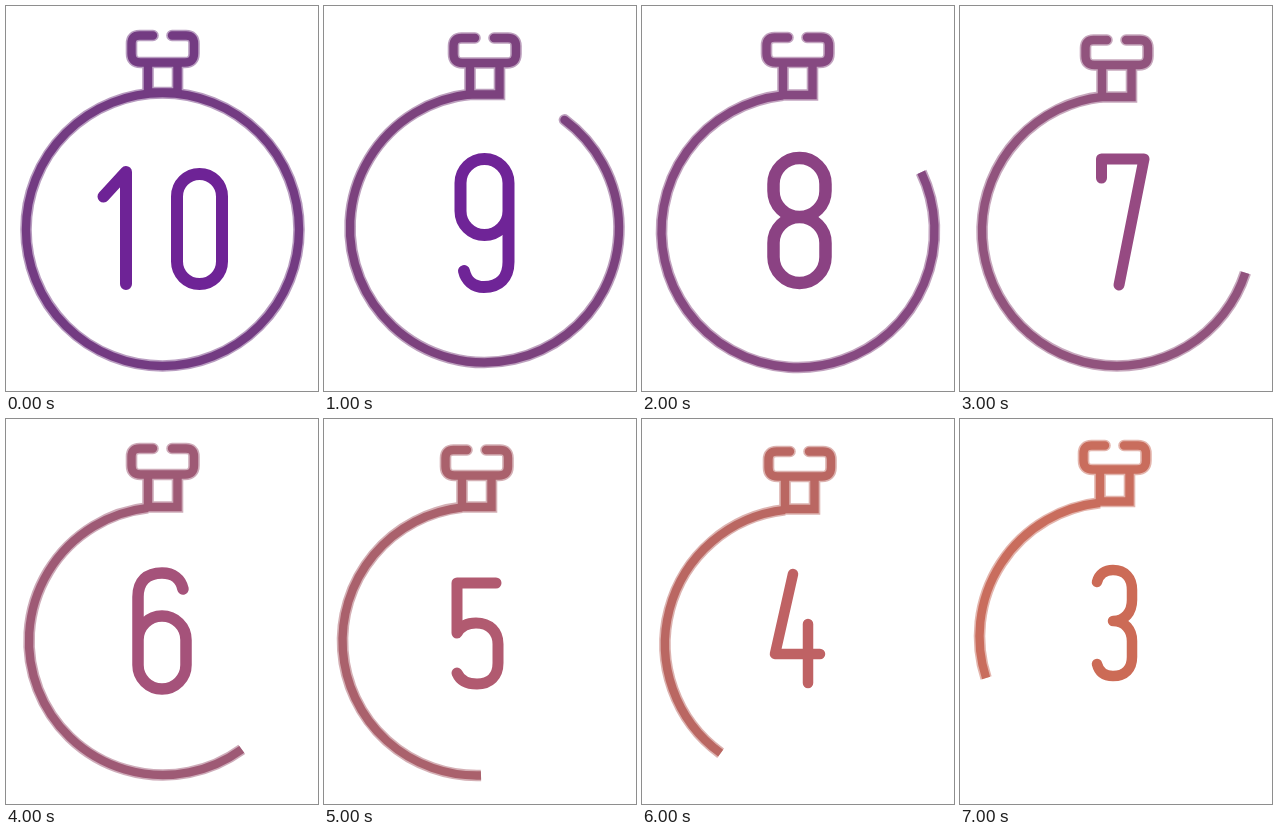
An HTML page that plays this animation: 312 px wide and 385 px high, repeating every 8 s.

```html
<!DOCTYPE html>
<html lang="en">
<head>
<meta charset="utf-8">
<title>Countdown stopwatch</title>
<style>
html, body { margin: 0; width: 100%; height: 100%; overflow: hidden; background: #fff; }
svg { display: block; width: 100vw; height: 100vh; }
path { fill: none; }
#digit { stroke-linecap: round; stroke-linejoin: round; }
</style>
</head>
<body>
<svg viewBox="0 0 312 385">
  <defs>
    <g id="watch">
      <path id="ring"/>
      <path id="stem"/>
      <path id="knob" stroke-linecap="round"/>
    </g>
  </defs>
  <use href="#watch" id="halo" stroke-width="11.6" opacity=".5"/>
  <use href="#watch" id="core" stroke-width="8.4"/>
  <path id="digit"/>
</svg>
<script>
const STEP = 1000, LOOP = 8000;
const $ = id => document.getElementById(id);
const set = (id, attrs) => {
  for (const k in attrs) $(id).setAttribute(k, attrs[k]);
};

// Closed pill outline
const pill = (x1, y1, x2, y2) => {
  const r = (x2 - x1) / 2, a = `A${r} ${r} 0 0 1 `;
  return `M${x1} ${y1 + r}${a}${x2} ${y1 + r}V${y2 - r}${a}${x1} ${y2 - r}Z`;
};

// c: ring centre x, y, radius; k: knob x, y, height; base: foot of the stem
const poses = [
  { c: [156.5, 223.5, 136.5], k: [120, 24, 38], base: 86.5, angle: 0,
    line: '#733b82', ink: '#6e2396', w: 12,
    d: 'M97.5 190.5L120 166V278' + pill(171, 168, 216, 278) },
  { c: [160.5, 222, 134.5], k: [124, 26.5, 36], base: 88.5, angle: 36.5,
    line: '#7c427e', ink: '#6f2497', w: 12,
    d: pill(136.5, 153, 184.5, 229) + 'M184.5 200V256C184.5 272 175 281 160 281C149 281 142 274 140 265' },
  { c: [156, 225, 136.5], k: [119, 26, 36], base: 89, angle: 64.5,
    line: '#864981', ink: '#8b4283', w: 12.5,
    d: pill(131.5, 152, 183.5, 211) + pill(131.5, 211, 183.5, 277) },
  { c: [157, 225, 135], k: [120, 28.5, 36], base: 91, angle: 108,
    line: '#91537d', ink: '#964a82', w: 11,
    d: 'M141.5 172V153H184L159 279' },
  { c: [157, 222, 134], k: [120, 24, 37], base: 88, angle: 144,
    line: '#9e5a75', ink: '#a5527a', w: 11.5,
    d: pill(132, 197, 180, 270) + 'M132 225V178C132 162 141 154 156 154C167 154 175 160 177 170' },
  { c: [153, 222, 134.5], k: [116, 25.5, 36.5], base: 88, angle: 178.3,
    line: '#aa616c', ink: '#b15a70', w: 11,
    d: 'M172 164H133V214C137 207 144 204 152 204C166 204 174 213 174 225V244C174 257 166 265 153 265C143 265 136 261 133 254' },
  { c: [158, 225, 135], k: [121, 27, 36], base: 90, angle: 216,
    line: '#ba6762', ink: '#bf6264', w: 10.5,
    d: 'M151 155L133 235H178M166 205V264' },
  { c: [154, 217.5, 134.5], k: [118, 21, 35], base: 82.5, angle: 252,
    line: '#c96d5d', ink: '#cc6b56', w: 10.5,
    d: 'M137 163C139 155 145 151 153 151C165 151 172 159 172 171V181C172 193 165 202 153 202C165 202 172 211 172 222V238C172 250 165 257 153 257C144 257 139 253 137 245' }
];

// The open ring runs clockwise from the hand angle to the stem at x = end
function ringPath([x, y, r], angle, end) {
  const a = angle * Math.PI / 180;
  const arc = `A${r} ${r} 0 `;
  if (!angle) return `M${x} ${y - r}${arc}0 1 ${x} ${y + r}${arc}0 1 ${x} ${y - r}Z`;
  const px = x + r * Math.sin(a), py = y - r * Math.cos(a);
  const top = y - Math.sqrt(r * r - (end - x) ** 2);
  return `M${px} ${py}${arc}${angle < 172 ? 1 : 0} 1 ${end} ${top}`;
}

function knobPath([x, y, h]) {
  const l = x + 5.5, r = x + 68, t = y + 5.5, b = y + h - 5.5;
  return `M${x + 27} ${t}H${l + 8}Q${l} ${t} ${l} ${t + 8}V${b - 9}Q${l} ${b} ${l + 9} ${b}` +
    `H${r - 9}Q${r} ${b} ${r} ${b - 9}V${t + 8}Q${r} ${t} ${r - 8} ${t}H${x + 46}`;
}

function draw(t) {
  const p = poses[Math.floor(t / STEP)];
  const [x, y, h] = p.k;
  const left = x + 22, right = x + 51.5, top = y + h - 6;
  set('ring', { d: ringPath(p.c, p.angle, left), 'stroke-linecap': p.angle < 45 ? 'round' : 'butt' });
  set('knob', { d: knobPath(p.k) });
  set('stem', { d: `M${left} ${top}V${p.base}H${right}V${top}` });
  set('halo', { stroke: p.line });
  set('core', { stroke: p.line });
  set('digit', { d: p.d, stroke: p.ink, 'stroke-width': p.w });
}

const start = performance.now();
function tick() {
  draw((performance.now() - start) % LOOP);
  requestAnimationFrame(tick);
}
tick();
</script>
</body>
</html>
```
